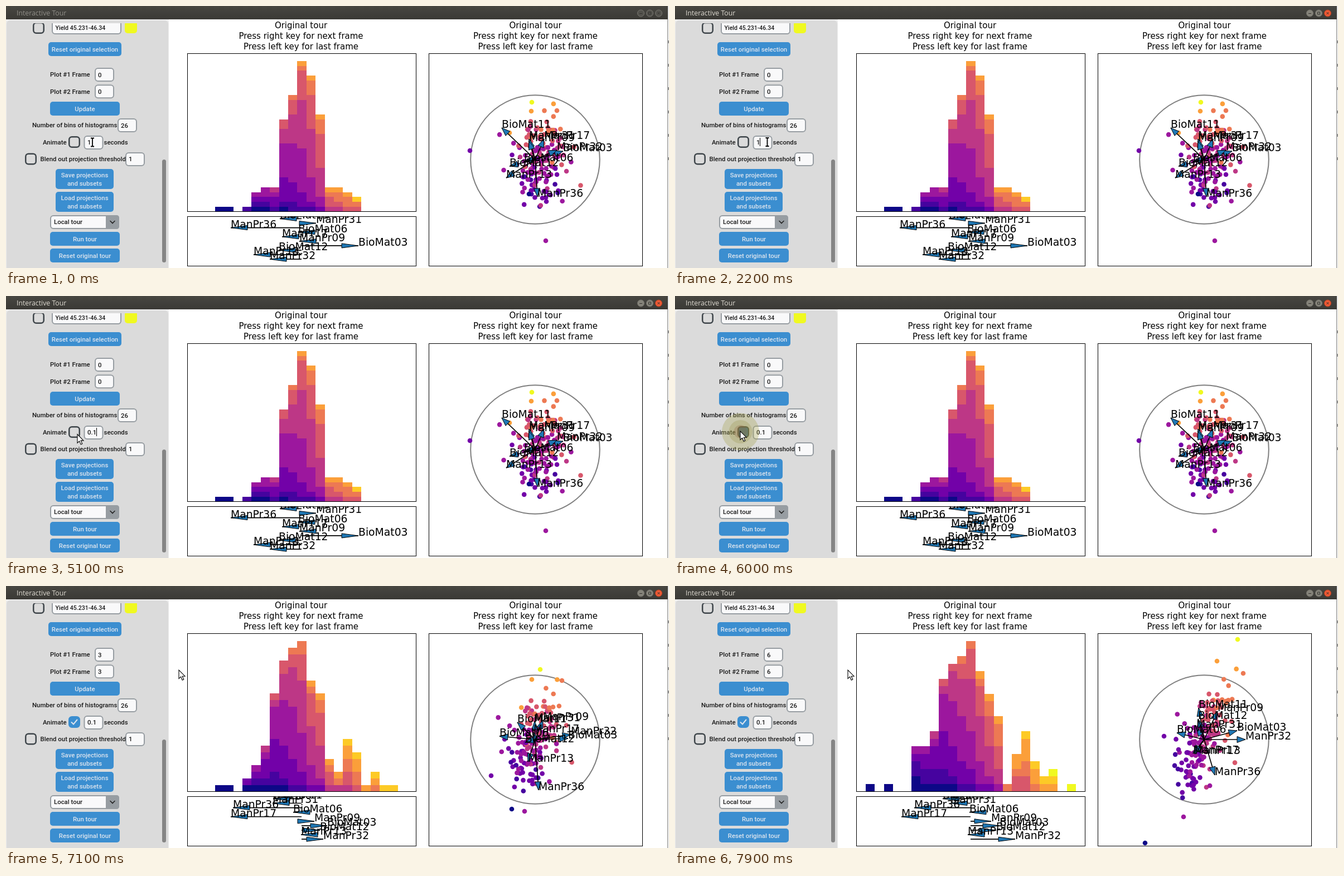
Animation of 1189 by 471 pixels, one loop 8000 ms. Source, as an HTML page:

```html
<!DOCTYPE html>
<html lang="en">
<head>
<meta charset="utf-8">
<title>Interactive Tour</title>
<style>
html, body { margin: 0; width: 100%; height: 100%; overflow: hidden; background: #fff; }
svg { display: block; width: 1189px; height: 471px; }
.ui { font: 500 11.4px Roboto, sans-serif; fill: #1a1a1a; }
.btn { fill: #dce4ee; text-anchor: middle; }
.small { font-size: 10.6px; }
.caption { font: 12.3px "Open Sans", sans-serif; }
.title { font: 15px "DejaVu Sans", sans-serif; text-anchor: middle; }
.label { font: 18.8px "DejaVu Sans", sans-serif; }
.crisp { shape-rendering: crispEdges; }
</style>
</head>
<body>
<svg id="stage" viewBox="0 0 1189 471" xmlns="http://www.w3.org/2000/svg"></svg>
<script>
const LOOP = 8000;
const PLASMA = ['#0d0887', '#46039f', '#7201a8', '#9c179e', '#bd3786',
  '#d8576b', '#ed7953', '#fb9f3a', '#fdca26', '#f0f921'];
const ORIGIN = [949, 276];
const BINS = 25, BIN_W = 16.4, LEFT = 325.5, BASE = 369.5;

// Bin heights in the three key poses, starting at the given bin.
const HEIGHTS = [
  { start: 3, h: [1, 1, 0, 1, 4, 5, 5, 19, 24, 31, 28, 20, 5, 5, 4, 3] },
  { start: 3, h: [1, 1, 0, 2, 4, 7, 15, 20, 22, 23, 17, 15, 5, 3, 8, 6, 1, 3, 1, 1] },
  { start: 1, h: [1, 0, 1, 0, 0, 6, 6, 8, 15, 17, 18, 20, 16, 13, 10, 1, 5, 8, 4, 2, 3, 0, 1] }
];

// Per key pose: tip in the lower strip, then x and y in the scatter plot.
const AXES = {
  BioMat11: [[491, 889, 219], [479, 917, 245], [480, 939, 219]],
  ManPr31: [[556, 938, 239], [478, 948, 243], [494, 935, 255]],
  ManPr36: [[403, 953, 343], [407, 955, 367], [429, 968, 340]],
  BioMat06: [[524, 929, 279], [515, 885, 270], [528, 900, 264]],
  ManPr17: [[495, 965, 239], [403, 946, 263], [406, 929, 301]],
  ManPr09: [[526, 938, 243], [553, 963, 241], [567, 973, 225]],
  BioMat03: [[632, 999, 261], [576, 1008, 274], [582, 1008, 260]],
  BioMat12: [[489, 903, 288], [563, 931, 281], [576, 938, 239]],
  ManPr13: [[444, 897, 309], [529, 936, 316], [525, 932, 302]],
  ManPr32: [[473, 988, 259], [569, 1013, 267], [610, 1023, 276]]
};

const lerp = (a, b, t) => a + (b - a) * t;
const clamp = (v, a, b) => Math.max(a, Math.min(b, v));
const range = n => [...Array(n).keys()];

let seed = 11;
const rand = () => (seed = seed * 16807 % 2147483647) / 2147483647;
const gauss = () => Math.sqrt(-2 * Math.log(rand())) * Math.cos(2 * Math.PI * rand());

// Colour grows along a direction that turns and lengthens with the tour.
function makeDot() {
  const c = clamp(Math.round(3.6 + 1.4 * gauss()), 1, 7);
  const u = c - 4, g = gauss(), h = gauss();
  return { c, at: [
    [957 + 4 * u + 27 * g, 273 - 20 * u + 27 * h],
    [948 + 10 * u + 22 * g, 273 - 23 * u + 26 * h],
    [952 + 16 * u + 14 * g, 270 - 27 * u + 29 * h]
  ] };
}
const OUTLIERS = [
  { c: 9, at: [[943, 173], [958, 150], [1009, 96]] },
  { c: 7, at: [[942, 189], [943, 168], [972, 135]] },
  { c: 6, at: [[988, 188], [997, 170], [1019, 157]] },
  { c: 2, at: [[832, 260], [870, 341], [877, 270]] },
  { c: 3, at: [[968, 422], [930, 405], [912, 415]] },
  { c: 0, at: [[938, 338], [907, 401], [843, 462]] }
];
const DOTS = [...range(155).map(makeDot), ...OUTLIERS];

const rect = (x, y, w, h, fill, extra = '') =>
  `<rect x="${x}" y="${y}" width="${w}" height="${h}" fill="${fill}" ${extra}/>`;
const text = (x, y, s, cls = 'ui', extra = '') => `<text x="${x}" y="${y}" class="${cls}" ${extra}>${s}</text>`;
const label = (x, cy, s, extra) => text(x, cy + 4, s, 'ui', extra);
const button = (x, y, w, h, ...lines) => rect(x, y, w, h, '#3b8ed0', 'rx="5"') +
  lines.map((s, i) => text(x + w / 2, y + h / 2 + 4 + (i - (lines.length - 1) / 2) * 15, s, 'ui btn')).join('');
const entry = (x, y, w, h) => rect(x + 1, y + 1, w - 2, h - 2, '#f9f9fa', 'rx="5" stroke="#979da2" stroke-width="2"');
const box = (x, y, extra = '') =>
  rect(x + 1.25, y + 1.25, 18.5, 18.5, 'none', `rx="5" stroke="#3e454a" stroke-width="2.5" ${extra}`);
const frame = (x, y, w, h) => rect(x, y, w, h, 'none', 'stroke="#000" class="crisp"');
const heading = x => ['Original tour', 'Press right key for next frame', 'Press left key for last frame']
  .map((s, i) => text(x, 40.3 + 18.8 * i, s, 'title')).join('');

function windowButtons() {
  const ring = (x, id) => `<circle id="${id}" cx="${x}" cy="13" r="6" fill="#53524d" stroke="#77766f"/>`;
  return ring(1138.5, 'min') + ring(1154.5, 'max') + ring(1170.5, 'close') +
    '<path d="M1136 13.5h5M1152.5 11h4v4h-4zM1168.5 11l4 4m0-4l-4 4" stroke="#33322e" fill="none"/>';
}

function sidebar() {
  return rect(0, 24, 292, 447, '#ebebeb') + rect(1, 26, 290, 460, '#dbdbdb', 'rx="6"') +
    '<g clip-path="url(#scroll)">' + box(48, 29) + entry(82, 25, 125, 26) +
    rect(213, 28, 22, 21, PLASMA[9], 'rx="5"') + '</g>' +
    text(88.5, 43, 'Yield 45.231-46.34', 'ui small') +
    button(76, 65, 131, 25, 'Reset original selection') +
    [1, 2].map(i => {
      const cy = 93 + 30.3 * i;
      return label(79, cy, `Plot #${i} Frame`) + entry(159, cy - 12.3, 35, 25) +
        label(165, cy + 0.5, '0', `id="num${i}"`);
    }).join('') +
    button(79, 172, 125, 25, 'Update') +
    label(47, 214, 'Number of bins of histograms') + entry(200, 202, 35, 25) + label(206, 214.5, '26') +
    label(66, 244.5, 'Animate') + entry(139.5, 233, 35, 25) + label(175.5, 244.5, 'seconds') +
    box(34, 264.5) + label(61.5, 275, 'Blend out projection threshold') +
    entry(214, 263, 35, 25) + label(220, 275, '1') +
    button(89, 293, 104, 36, 'Save projections', 'and subsets') +
    button(89, 334, 104, 36, 'Load projections', 'and subsets') +
    entry(79, 376, 124, 25) +
    '<path d="M179 376h19q5 0 5 5v15q0 5-5 5h-19z" fill="#979da2"/>' +
    '<path d="M187 386.5l4 4 4-4" fill="none" stroke="#222" stroke-width="1.6" stroke-linecap="round"/>' +
    label(86, 388, 'Local tour') +
    button(79, 406, 125, 25, 'Run tour') + button(79, 436, 125, 25, 'Reset original tour') +
    rect(280, 276, 7, 185, '#858585', 'rx="3.5"');
}

const stage = document.getElementById('stage');
stage.innerHTML = `<defs>
  <clipPath id="scroll"><rect x="0" y="31" width="292" height="440"/></clipPath>
  <clipPath id="strip"><rect x="325" y="379" width="410" height="88"/></clipPath>
  <clipPath id="plane"><rect x="759" y="86" width="382" height="381"/></clipPath>
  <linearGradient id="bar" x2="0" y2="1"><stop stop-color="#484742"/><stop offset="1" stop-color="#3a3935"/></linearGradient>
  </defs>` +
  rect(0, 0, 1189, 471, '#fff') + rect(0, 0, 1187, 24, 'url(#bar)') +
  text(19, 17, 'Interactive Tour', 'caption', 'id="caption"') + windowButtons() +
  rect(1186, 24, 1, 447, '#8a8a88') + rect(1187, 0, 2, 471, '#ececec') +
  range(6).map(i => rect(1187.5, 62 + 42 * i, 1.5, 5, '#777')).join('') +
  sidebar() + heading(529) + heading(949.5) +
  '<g id="bars" class="crisp"></g><g id="arrows" clip-path="url(#strip)"></g>' +
  frame(LEFT, 85.5, 410, 284) + frame(LEFT, 378.5, 410, 89) +
  '<circle cx="949" cy="276" r="115.8" fill="none" stroke="#7f7f7f" stroke-width="2"/>' +
  '<g id="scatter" clip-path="url(#plane)"></g>' + frame(758.5, 85.5, 382.5, 382) +
  label(146, 245, '1', 'id="secs"') + rect(0, 237, 1, 15, '#000', 'id="caret" class="crisp"') +
  box(112, 234, 'id="check"') +
  '<path id="tick" d="M117.5 245l3.5 3.500 6.500-8" fill="none" stroke="#dce4ee" stroke-width="2" stroke-linecap="round"/>' +
  `<g id="halo"><circle r="33.5" fill="#a3a04a" opacity=".32"/><circle r="21" fill="#8f8a3c" opacity=".25"/>
   <circle r="12" fill="#8a5a3c" opacity=".25"/></g>
   <path id="arrow" d="M0 0V15.5L3.6 12.2 6.2 18.2 8.8 17 6.2 11.2H11z" fill="#fff" stroke="#000" stroke-width="1.1"/>
   <path id="beam" d="M-3-7.5h2l1 1 1-1h2M0-6.5V6.5M-3 7.5h2l1-1 1 1h2" fill="none" stroke="#000" stroke-width="1.8"/>`;

const $ = id => document.getElementById(id);
const set = (id, attrs) => { for (const k in attrs) $(id).setAttribute(k, attrs[k]); };
const show = (id, on) => set(id, { visibility: on ? 'visible' : 'hidden' });

// Head polygon with its tip at (x, y), pointing along (dx, dy).
function head(x, y, dx, dy, len, half) {
  const d = Math.hypot(dx, dy) || 1, ux = dx / d, uy = dy / d;
  const bx = x - ux * len, by = y - uy * len;
  return `<path d="M${x} ${y}L${bx - uy * half} ${by + ux * half}L${bx + uy * half} ${by - ux * half}z" fill="#1f77b4" stroke="#000"/>`;
}
const line = (x1, y1, x2, y2) => `<path d="M${x1} ${y1}L${x2} ${y2}" stroke="#000" stroke-width="1.7"/>`;

// Share of a bin at or below colour c; bins further right hold higher colours.
function share(bin, c) {
  if (c === 9) return 1;
  const middle = 2.85 + 0.45 * (bin - 10);
  return 1 / (1 + Math.exp((middle - c - 0.5) / 0.68));
}

function drawBars(k, t) {
  const height = (pose, b) => HEIGHTS[pose].h[b - HEIGHTS[pose].start] || 0;
  const heights = range(BINS).map(b => Math.round(lerp(height(k, b), height(k + 1, b), t)));
  const unit = 284 / 1.05 / Math.max(...heights);
  const edge = b => Math.round(LEFT + BIN_W * b);
  const level = n => Math.round(BASE - n * unit);
  let out = '';
  heights.forEach((h, b) => {
    let low = 0;
    for (let c = 0; c < 10; c++) {
      const top = Math.round(h * share(b, c));
      if (top > low) out += rect(edge(b), level(top), edge(b + 1) - edge(b), level(low) - level(top), PLASMA[c]);
      low = top;
    }
  });
  $('bars').innerHTML = out;
}

function drawPlots(n) {
  const k = n < 3 ? 0 : 1, t = n / 3 - k;
  const mix = poses => poses[k].map((v, i) => lerp(v, poses[k + 1][i], t));
  drawBars(k, t);

  let strip = '', names = '', rays = '', tags = '';
  Object.entries(AXES).forEach(([name, poses], i) => {
    const [tip, px, py] = mix(poses), y = 382.4 + 8.09 * i;
    strip += line(530, y, tip, y) + head(tip, y, tip - 530, 0, 30, 4);
    names += text(tip, y, name, 'label');
    rays += line(...ORIGIN, px, py) + head(px, py, px - ORIGIN[0], py - ORIGIN[1], 15, 5.5);
    tags += text(px, py, name, 'label');
  });
  $('arrows').innerHTML = strip + names;
  $('scatter').innerHTML = DOTS.map(({ c, at }) => {
    const [x, y] = mix(at);
    return `<circle cx="${x}" cy="${y}" r="4.3" fill="${PLASMA[c]}"/>`;
  }).join('') + rays + tags;
}

// Pointer stops: time, x, y.
const PATH = [[0, 155, 245], [400, 155, 245], [500, 159, 246], [1100, 170.5, 249], [1300, 181, 249],
  [1400, 170.5, 249], [1800, 170.5, 249], [1900, 165.5, 244.5], [4700, 165.5, 244.5], [4900, 150, 260],
  [5200, 117, 243], [6500, 117, 243], [6900, 310, 151], [LOOP, 310, 151]];
function pointer(t) {
  const i = PATH.findIndex(p => p[0] > t), a = PATH[i - 1], b = PATH[i];
  const f = (t - a[0]) / (b[0] - a[0]);
  return [lerp(a[1], b[1], f), lerp(a[2], b[2], f)];
}

const within = (t, ...spans) => spans.some(([a, b]) => t >= a && t < b);
const latest = (t, steps) => steps.filter(s => t >= s[0]).pop()[1];

let drawn = -1;
function render(t) {
  const step = latest(t, [[0, 0], [6600, 1], [6800, 2], [7100, 3], [7300, 4], [7600, 5], [7900, 6]]);
  if (step !== drawn) drawPlots(drawn = step);
  $('num1').textContent = $('num2').textContent = t >= 6500 ? Math.max(1, step) : 0;
  $('secs').textContent = latest(t, [[0, '1'], [2900, ''], [3600, '0'], [3700, '0.'], [4000, '0.1']]);

  const focused = t >= 1900;
  $('caption').style.fill = focused ? '#dfdbd2' : '#918f89';
  set('close', focused ? { fill: '#ee5a36', stroke: '#b8401f' } : { fill: '#53524d', stroke: '#77766f' });
  for (const id of ['min', 'max']) set(id, { fill: focused ? '#85837a' : '#53524d' });

  show('caret', within(t, [2100, 2700], [3100, 3600], [3700, 4600], [4900, 5500]));
  set('caret', { x: latest(t, [[0, 152], [2900, 146], [3600, 152], [3700, 155], [4000, 162]]) });

  const checked = t >= 6200, hover = within(t, [5200, 6600]);
  const blue = hover ? '#36719f' : '#3b8ed0';
  set('check', { fill: checked || hover ? blue : 'none', stroke: checked ? blue : '#3e454a' });
  show('tick', checked);

  const [x, y] = pointer(t), arrow = within(t, [900, 1900], [4900, LOOP]);
  const at = { transform: `translate(${x} ${y})` };
  set('arrow', at);
  set('beam', at);
  show('arrow', arrow);
  show('beam', !arrow);
  set('halo', { transform: `translate(${x + 0.5} ${y + 1})` });
  show('halo', within(t, [500, 1800], [5700, 6400]));
}

function loop(now) {
  render(Math.floor(now % LOOP / 100) * 100);
  requestAnimationFrame(loop);
}
render(0);
requestAnimationFrame(loop);
</script>
</body>
</html>
```
